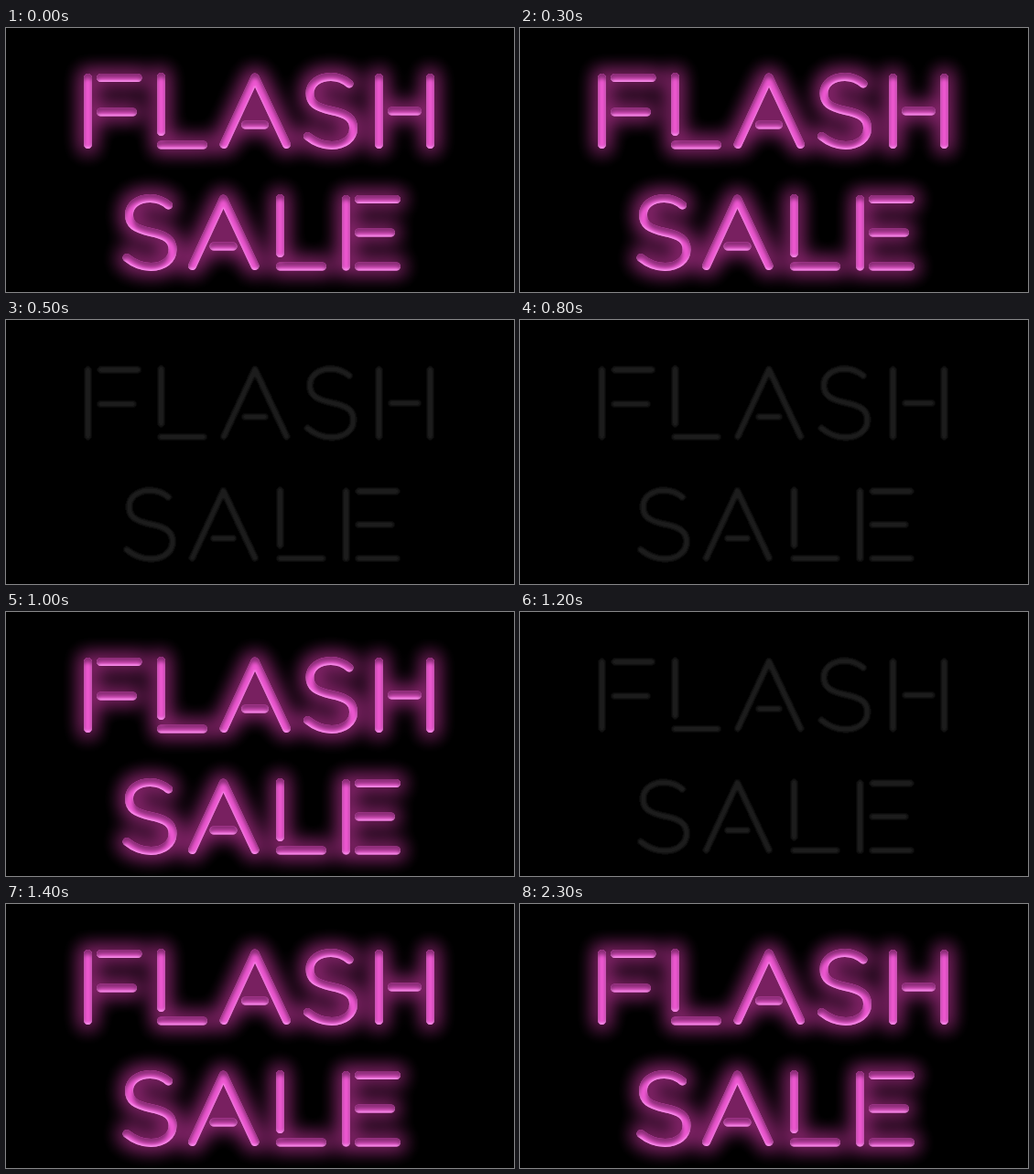
Recreate the animation shown at these times as an HTML page. Size 555 px wide and 289 px high, loop 2.9 s.

```html
<!DOCTYPE html>
<html lang="en">
<head>
<meta charset="utf-8">
<title>Flash sale</title>
<style>
  html, body { margin: 0; width: 100%; height: 100%; overflow: hidden; background: #000; }
  svg { display: block; width: 100vw; height: 100vh; }
  path { fill: none; stroke-linecap: round; stroke-linejoin: round; }
  #off path { stroke: #1f1f1f; stroke-width: 6.5; }
  #lit path { stroke: #ee58d2; stroke-width: 9; }
</style>
</head>
<body>
<svg viewBox="0 0 555 289" role="img" aria-label="FLASH SALE">
  <defs>
    <filter id="soft" filterUnits="userSpaceOnUse" x="0" y="0" width="555" height="289">
      <feGaussianBlur stdDeviation="1.1"/>
    </filter>
    <filter id="neon" filterUnits="userSpaceOnUse" x="-40" y="-40" width="635" height="369"
            color-interpolation-filters="sRGB">
      <!-- halo around the tubes -->
      <feMorphology in="SourceAlpha" operator="dilate" radius="6"/>
      <feGaussianBlur stdDeviation="10"/>
      <feComponentTransfer result="spread">
        <feFuncA type="linear" slope="1.22" intercept="-0.04"/>
      </feComponentTransfer>
      <feFlood flood-color="#782060"/>
      <feComposite in2="spread" operator="in" result="halo"/>
      <!-- shade along the upper edges -->
      <feFlood flood-color="#7a2668" flood-opacity="0.85"/>
      <feComposite in2="SourceAlpha" operator="out"/>
      <feOffset dy="4.5"/>
      <feGaussianBlur stdDeviation="2.2"/>
      <feComposite in2="SourceAlpha" operator="in" result="shade"/>
      <!-- shine along the lower edges -->
      <feFlood flood-color="#ff9cf4" flood-opacity="0.9"/>
      <feComposite in2="SourceAlpha" operator="out"/>
      <feOffset dy="-2"/>
      <feGaussianBlur stdDeviation="1"/>
      <feComposite in2="SourceAlpha" operator="in" result="shine"/>
      <feMerge>
        <feMergeNode in="halo"/>
        <feMergeNode in="SourceGraphic"/>
        <feMergeNode in="shine"/>
        <feMergeNode in="shade"/>
      </feMerge>
    </filter>
  </defs>
  <g id="off" filter="url(#soft)"></g>
  <g id="lit" filter="url(#neon)"></g>
</svg>
<script>
  const glyphs = {
    F: 'M89.5 54.5V127.5M103.5 54.5H144M103.5 92H138.5',
    L: 'M169.5 53.5V113.5M169.5 128H215.5',
    A: 'M238 127.5L272 54L306.5 127.5M261.5 106H282.5',
    S: 'M375 61C369 56 363 53.5 355 53.5C341.5 53.5 332 61 332 71.5' +
       'C332 82 338 86.5 355.5 90.5C373 94 379.5 99 379.5 109.5' +
       'C379.5 121 369.5 128.5 356 128.5C345.5 128.5 337.5 125 329.5 118.5',
    H: 'M407.5 54.5V127.5M463.5 54.5V127.5M421.5 91H449.5',
    E: 'M371.5 54.5V128M385.5 54.5H426.5M385.5 91H420.5M385.5 128H426.5'
  };
  // letter, shift x, shift y
  const sign = [
    ['F', 0, 0], ['L', 0, 0], ['A', 0, 0], ['S', 0, 0], ['H', 0, 0],
    ['S', -197.5, 133], ['A', -34.5, 133], ['L', 130, 133], ['E', 0, 133]
  ];
  const loop = 2900;
  // time in ms, lamp on
  const steps = [[0, 1], [500, 0], [1000, 1], [1200, 0], [1400, 1], [loop, 1]];

  const markup = sign.map(([letter, x, y]) =>
    `<path d="${glyphs[letter]}" transform="translate(${x} ${y})"/>`).join('');

  function blink(id, wanted) {
    const group = document.getElementById(id);
    group.innerHTML = markup;
    group.animate(
      steps.map(([time, on]) => ({
        offset: time / loop,
        opacity: on === wanted ? 1 : 0,
        easing: 'step-end'
      })),
      { duration: loop, iterations: Infinity }
    );
  }

  blink('off', 0);
  blink('lit', 1);
</script>
</body>
</html>
```
